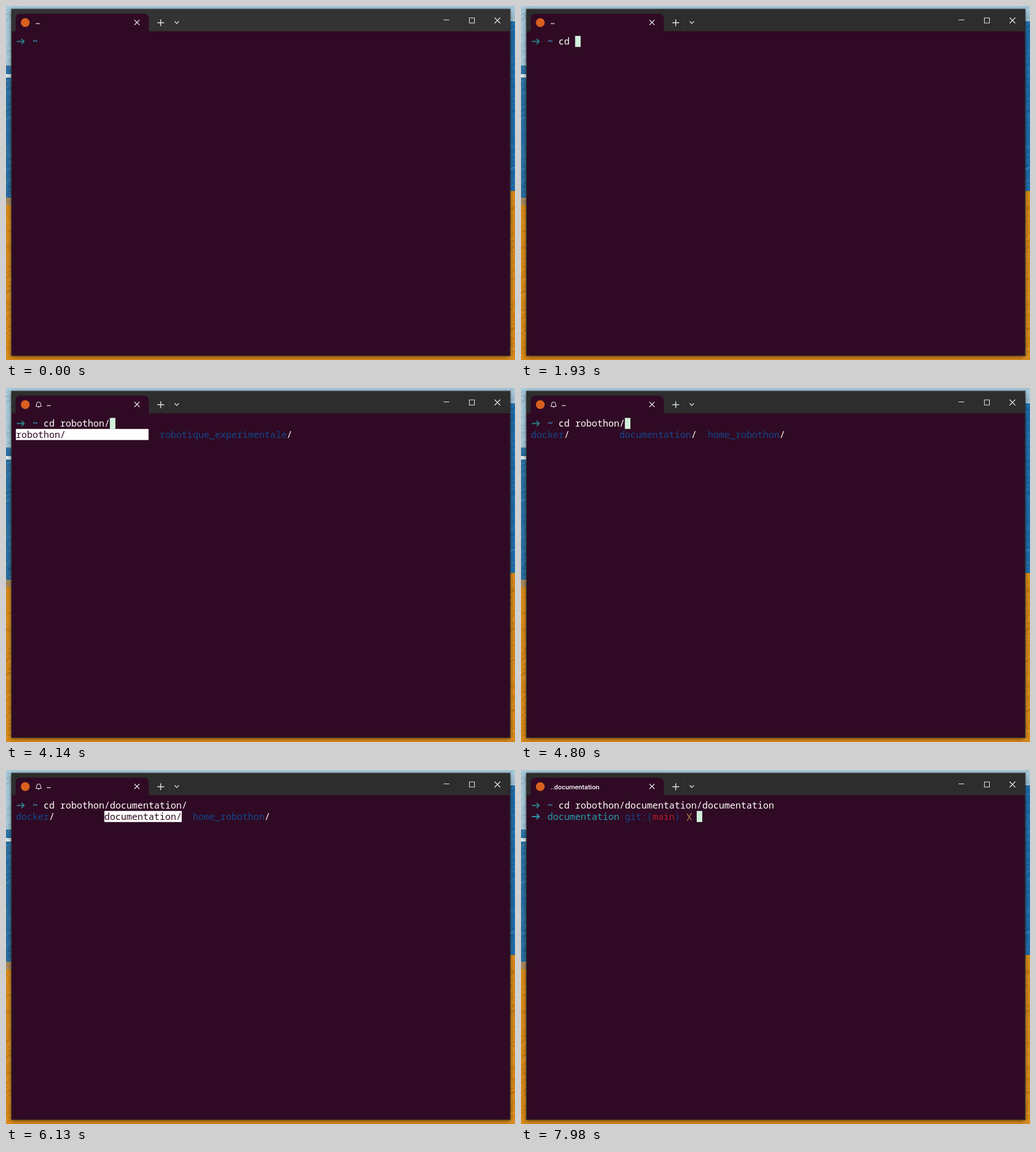
Recreate the animation shown at these times as an HTML page with a canvas. Size 898 px wide and 624 px high, loop 8 s.

```html
<!DOCTYPE html>
<html>
<head>
<meta charset="utf-8">
<style>
html, body { margin: 0; height: 100%; overflow: hidden; background: #300a24; }
canvas { display: block; }
</style>
</head>
<body>
<canvas id="stage" width="898" height="624"></canvas>
<script>
const ctx = document.getElementById('stage').getContext('2d');
const LOOP = 8000, BLINK = 585, CELL = 9.75, ROW = 19.5, LEFT = 17.5, TOP = 52.7;
const BG = '#300a24', WHITE = '#ffffff', BLUE = '#12488b', CYAN = '#2a9caf';

const HOME = 'cd robothon/', DOCS = HOME + 'documentation/';
const OUTER_DIRS = ['robothon', 'robotique_experimentale'];
const INNER_DIRS = ['docker', 'documentation', 'home_robothon'];

// One step per key press: the time and the state it changes.
const STEPS = [
  [0, { cmd: '', title: '~', menu: null, sel: -1, row: 0 }],
  [800, { focus: true }],
  ...type('', 'cd ', 1730, 100),
  ...type('cd ', 'robot', 2650, 143),
  [3680, { menu: OUTER_DIRS, bell: true }],
  [4140, { cmd: HOME, sel: 0 }],
  [4470, { menu: null, sel: -1 }],
  [4800, { menu: INNER_DIRS }],
  [5330, { cmd: HOME + 'docker/', sel: 0 }],
  [5530, { cmd: DOCS, sel: 1 }],
  [6730, { menu: null, bell: false }],
  [7190, { cmd: DOCS + 'documentation/' }],
  [7900, { cmd: DOCS + 'documentation', title: '..documentation', row: 1 }]
];

function type(before, word, start, gap) {
  return [...word].map((_, i) => [start + i * gap, { cmd: before + word.slice(0, i + 1) }]);
}

function rect(x, y, w, h, color) {
  ctx.fillStyle = color;
  ctx.fillRect(x, y, w, h);
}

function line(color, width, ...paths) {
  ctx.strokeStyle = color;
  ctx.lineWidth = width;
  ctx.beginPath();
  for (const p of paths)
    for (let i = 0; i < p.length; i += 2) ctx[i ? 'lineTo' : 'moveTo'](p[i], p[i + 1]);
  ctx.stroke();
}

function disc(x, y, r, color) {
  ctx.fillStyle = color;
  ctx.beginPath();
  ctx.arc(x, y, r, 0, 7);
  ctx.fill();
}

function cross(x, y, r) {
  line('#f2f2f2', 1.2, [x - r, y - r, x + r, y + r], [x + r, y - r, x - r, y + r]);
}

function text(col, row, str, color, weight = 500) {
  ctx.font = weight + ' 16.25px "Noto Sans Mono", monospace';
  ctx.fillStyle = color;
  ctx.fillText(str, LEFT + col * CELL, 68 + row * ROW);
}

function cell(col, row, n, color) {
  rect(LEFT + col * CELL, TOP + row * ROW, n * CELL, ROW, color);
}

function arrow(row, color) {
  const y = 62.5 + row * ROW;
  line(color, 2, [19, y, 32, y], [27.5, y - 4.5, 32, y, 27.5, y + 4.5]);
}

// Painted beach behind the window, seen as a thin frame.
function makeWallpaper() {
  rect(0, 0, 898, 624, '#a6c9da');
  rect(0, 105, 449, 519, '#2a70a4');
  rect(449, 27, 449, 597, '#1b6cad');
  rect(0, 338, 449, 286, '#d98a18');
  rect(449, 326, 449, 298, '#d98a18');
  rect(0, 338, 10, 13, '#a9895c');
  rect(0, 120, 10, 6, '#e4eef2');
  let seed = 7;
  const rnd = () => (seed = seed * 16807 % 2147483647) / 2147483647;
  for (let i = 0; i < 700; i++) {
    const x = i % 2 * 888 + rnd() * 10, y = rnd() * 624;
    line(rnd() < .5 ? 'rgba(255,255,255,.07)' : 'rgba(0,0,0,.07)', 1.5, [x - 4, y + 2, x + 4, y - 2]);
  }
  ctx.shadowColor = 'rgba(0,0,0,.55)';
  ctx.shadowBlur = 8;
  ctx.shadowOffsetY = 2;
  rect(10, 6, 879, 610, BG);
  ctx.shadowColor = 'transparent';
  ctx.strokeStyle = 'rgba(45,45,45,.75)';
  ctx.strokeRect(9.5, 5.5, 880, 611);
  return ctx.getImageData(0, 0, 898, 624);
}

function drawBell() {
  ctx.strokeStyle = '#e8e8e8';
  ctx.lineWidth = 1.1;
  ctx.beginPath();
  ctx.arc(57.5, 28, 3.3, Math.PI, 0);
  ctx.lineTo(62, 32.5);
  ctx.lineTo(53, 32.5);
  ctx.closePath();
  ctx.moveTo(56, 34);
  ctx.lineTo(59, 34);
  ctx.stroke();
}

function drawTitleBar(s) {
  rect(10, 6, 879, 38.5, s.focus ? '#2d2d2d' : '#333333');
  ctx.fillStyle = BG;
  ctx.beginPath();
  ctx.roundRect(17, 13.5, 235, 32, [8, 8, 0, 0]);
  ctx.fill();
  disc(34, 29.3, 7.8, '#d9601f');
  if (s.bell) drawBell();
  ctx.font = '500 11.8px Roboto, sans-serif';
  ctx.fillStyle = WHITE;
  ctx.fillText(s.title, s.bell ? 71.5 : 52, 34);
  cross(231, 29, 4.5);
  cross(867, 25.5, 5);
  line('#f2f2f2', 1.2, [297.5, 27, 301.3, 30.8, 305, 27]);
  line('#e4eef2', 1.4, [267, 29.5, 279, 29.5], [273, 23.5, 273, 35.5]);
  line('#f2f2f2', 1, [772, 24.5, 782, 24.5]);
  ctx.strokeRect(817.5, 21, 9, 9);
  if (s.focus) line('#2c3e4a', 1, [288.5, 17, 288.5, 40]);
}

function drawMenu({ menu, sel }) {
  const width = Math.max(...menu.map(name => name.length)) + 1;
  menu.forEach((name, i) => {
    const col = i * (width + 2), on = i === sel;
    if (on) cell(col, 1, width, WHITE);
    text(col, 1, name, on ? BG : BLUE);
    text(col + name.length, 1, '/', on ? BG : WHITE);
  });
}

function drawGitPrompt() {
  arrow(1, CYAN);
  text(3, 1, 'documentation', CYAN);
  text(17, 1, 'git:(', BLUE);
  text(22, 1, 'main', '#b81c2a');
  text(26, 1, ')', BLUE);
  line('#a2734c', 1.5, [301, 75.5, 293, 90], [293, 77, 301, 88.5]);
}

function drawPointer(t) {
  const away = Math.max(0, 1 - (t - 400) / 230) ** 2;
  ctx.save();
  ctx.translate(326 + 576 * away, 267 + 471 * away);
  ctx.fillStyle = WHITE;
  ctx.fill(new Path2D('M0 0V15.5L3.5 12.2 6 17.3 8.4 16.1 6 11.2 10.8 11Z'));
  if (t >= 800 && t < 870) disc(-.5, -.7, 11.8, 'rgba(255,255,0,.47)');
  ctx.restore();
}

const wallpaper = makeWallpaper();

function frame(now) {
  const t = now % LOOP;
  const past = STEPS.filter(step => step[0] <= t);
  const s = Object.assign({}, ...past.map(step => step[1]));
  const idle = t - past.at(-1)[0];

  ctx.putImageData(wallpaper, 0, 0);
  drawTitleBar(s);
  arrow(0, '#2c7f88');
  text(3, 0, '~', '#3d97c0', 700);
  text(5, 0, s.cmd, WHITE);
  if (s.menu) drawMenu(s);
  if (s.row) drawGitPrompt();
  if (s.focus && Math.floor(idle / BLINK) % 2 === 0)
    cell(s.row ? 30 : 5 + s.cmd.length, s.row, 1, '#d2f2dd');
  if (t >= 400 && t < 1730) drawPointer(t);
  requestAnimationFrame(frame);
}
requestAnimationFrame(frame);
</script>
</body>
</html>
```
